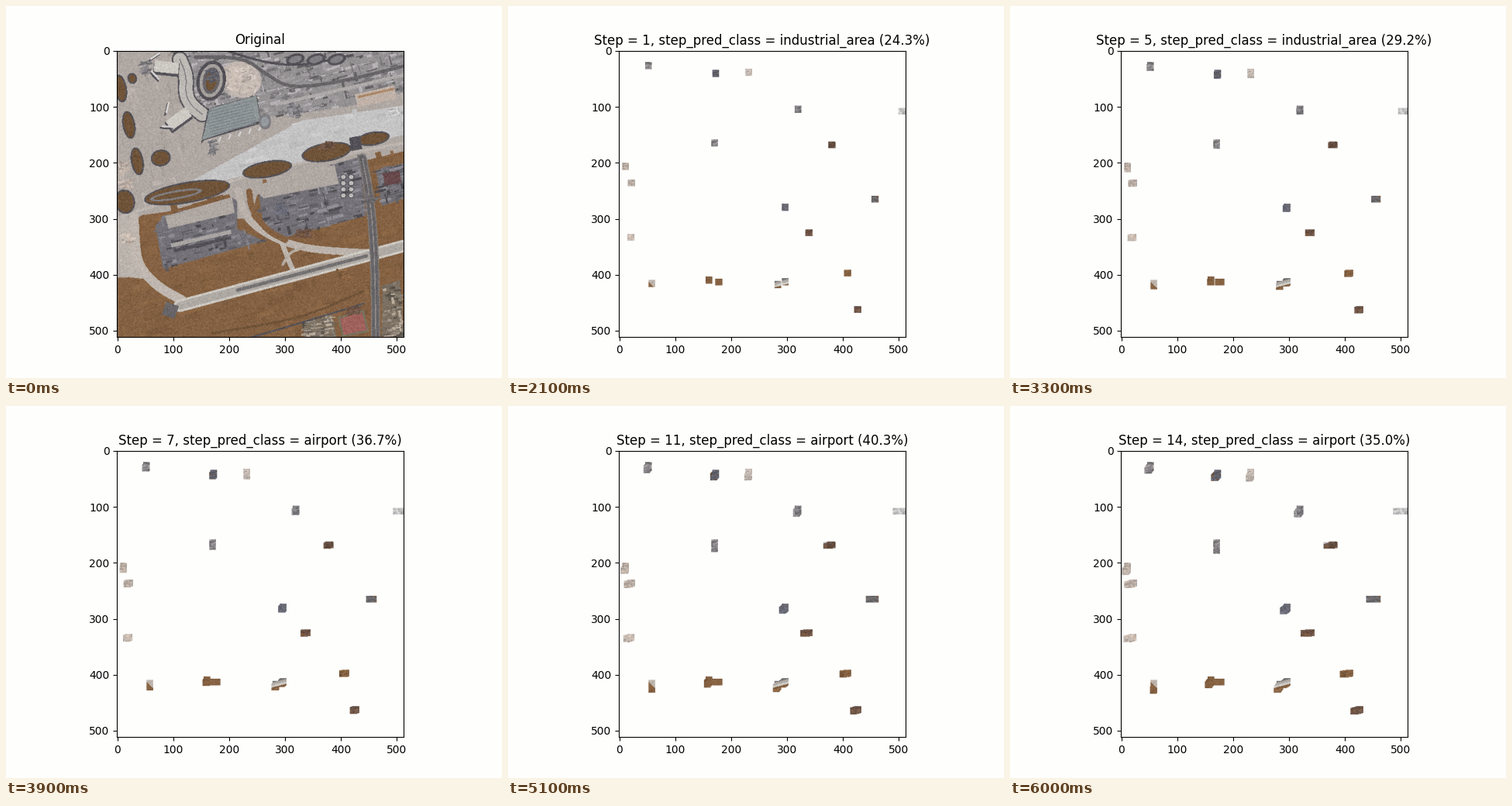
A matplotlib script that plays this animation: 640 by 480 pixels, repeating every 6.3 s.

```python
import math

import numpy as np
import matplotlib.pyplot as plt
from matplotlib.animation import FuncAnimation
from matplotlib.path import Path

SIZE, WINDOW, LAST = 512, 12, 14
STILL = 6  # ticks the full picture stays
PAPER = (254, 255, 253)
rng = np.random.default_rng(7)
Y, X = np.mgrid[0:SIZE, 0:SIZE].astype(float)

APRON, PALE, WHITE = (176, 168, 163), (198, 197, 198), (206, 202, 196)
GRASS, EARTH, UMBER = (133, 98, 67), (112, 84, 57), (110, 84, 70)
DARK, ROAD, SLATE, GREY = (84, 82, 88), (104, 101, 104), (100, 101, 112), (128, 126, 130)
SAND, BEIGE = (194, 184, 177), (192, 178, 168)

# start corner, steps down (the rest go left), tone of the ground there
AGENTS = [
    (47, 21, 9, GREY), (167, 35, 8, SLATE), (226, 33, 11, SAND), (314, 99, 9, GREY),
    (500, 103, 0, PALE), (165, 159, 14, GREY), (375, 163, 1, UMBER), (6, 201, 10, BEIGE),
    (17, 231, 3, BEIGE), (16, 328, 3, BEIGE), (53, 410, 13, None), (155, 404, 9, None),
    (173, 408, 0, None), (278, 412, 9, None), (291, 407, 6, None), (291, 274, 7, SLATE),
    (334, 320, 1, UMBER), (452, 260, 0, ROAD), (403, 392, 2, GRASS), (421, 457, 3, UMBER),
]
RESULTS = ([("chaparral", 10.9)]
           + [("industrial_area", p) for p in (24.3, 28.6, 31.0, 29.7, 29.2)]
           + [("airport", p) for p in (28.4, 36.7, 40.8, 41.6, 39.4, 40.3, 41.1, 40.2, 35.0)])

img = np.empty((SIZE, SIZE, 3))
img[:] = APRON


def shades(color, spread=.15):
    return [np.array(color) * k for k in np.linspace(1 - spread, 1 + spread, 5)]


def fill(pts, color):
    inside = Path(pts).contains_points(np.c_[X.ravel(), Y.ravel()])
    img[inside.reshape(SIZE, SIZE)] = color


def local(cx, cy, w, h, ang):
    r = int(math.hypot(w, h) / 2) + 2
    ys = slice(max(0, int(cy) - r), max(0, int(cy) + r))
    xs = slice(max(0, int(cx) - r), max(0, int(cx) + r))
    dx, dy = X[ys, xs] - cx, Y[ys, xs] - cy
    c, s = math.cos(math.radians(ang)), math.sin(math.radians(ang))
    return img[ys, xs], 2 * (dx * c + dy * s) / w, 2 * (dy * c - dx * s) / h


def box(cx, cy, w, h, color, ang=0):
    part, u, v = local(cx, cy, w, h, ang)
    part[(abs(u) <= 1) & (abs(v) <= 1)] = color


def oval(cx, cy, w, h, color, ang=0):
    part, u, v = local(cx, cy, w, h, ang)
    part[u * u + v * v <= 1] = color


def smooth(pts):
    for _ in range(2):
        out = [pts[0]]
        for (ax, ay), (bx, by) in zip(pts, pts[1:]):
            out += [(.75 * ax + .25 * bx, .75 * ay + .25 * by),
                    (.25 * ax + .75 * bx, .25 * ay + .75 * by)]
        pts = out + [pts[-1]]
    return pts


def strip(pts, width, color):
    pts = smooth(pts) if len(pts) > 2 else pts
    for (ax, ay), (bx, by) in zip(pts, pts[1:]):
        dx, dy = bx - ax, by - ay
        t = np.clip(((X - ax) * dx + (Y - ay) * dy) / (dx * dx + dy * dy), 0, 1)
        near = (X - ax - t * dx) ** 2 + (Y - ay - t * dy) ** 2
        img[near <= width * width / 4] = color


def clutter(pts, n, size, colors, ang=-14):
    area = Path(pts)
    lo, hi = np.min(pts, axis=0), np.max(pts, axis=0)
    for _ in range(n):
        x, y = rng.uniform(lo, hi)
        w, h = size * rng.uniform(.5, 2.2), size * rng.uniform(.15, .6)
        color = colors[rng.integers(len(colors))]
        if area.contains_point((x, y)):
            box(x, y, w, h, color, ang + 90 * (rng.random() < .2))


def island(cx, cy, w, h, ang=-10):
    oval(cx, cy, w, h, DARK, ang)
    oval(cx, cy, w - 6, h - 6, EARTH, ang)


def paint_grass():
    field = [(28, 305), (45, 294), (90, 288), (240, 245), (512, 180), (512, 512), (0, 512),
             (0, 405), (20, 405)]
    fill(field, GRASS)
    clutter(field, 250, 24, shades(GRASS, .06), -15)
    fill([(200, 255), (425, 190), (425, 205), (250, 258), (238, 300), (215, 300)], APRON)
    fill([(0, 300), (30, 298), (34, 350), (48, 408), (5, 403), (0, 340)], (188, 181, 174))
    strip([(30, 298), (32, 345), (38, 385), (72, 422), (116, 446)], 17, (192, 184, 176))
    strip([(217, 250), (222, 280), (240, 310), (284, 338), (340, 354), (400, 359),
           (460, 362)], 13, (188, 180, 172))
    strip([(295, 345), (305, 372), (314, 392)], 9, (190, 182, 174))
    strip([(335, 352), (308, 360), (296, 382)], 5, (182, 172, 162))
    strip([(112, 456), (512, 349)], 22, WHITE)
    strip([(112, 456), (512, 349)], 14, (176, 170, 165))
    strip([(215, 428), (445, 367)], 6, (116, 113, 114))
    box(95, 464, 24, 24, ROAD, 20)
    strip([(170, 505), (330, 478), (440, 430)], 4, EARTH)


def paint_apron():
    band = [(130, 235), (265, 160), (330, 125), (512, 98), (512, 150), (350, 195), (130, 246)]
    fill(band, PALE)
    clutter(band, 90, 16, shades(PALE, .05))
    clutter([(0, 0), (110, 0), (140, 240), (0, 300)], 80, 16, shades(APRON, .06), 75)
    strip([(0, 300), (130, 255), (300, 205), (512, 165)], 5, (188, 181, 176))


def paint_north():
    zone = [(100, 0), (512, 0), (512, 75), (420, 98), (330, 112), (255, 120), (140, 95)]
    fill(zone, (150, 147, 148))
    clutter(zone, 650, 9, shades((142, 139, 142), .3))
    oval(220, 52, 76, 64, SAND, 15)
    oval(220, 52, 60, 48, (204, 192, 183), 15)
    clutter([(190, 30), (250, 30), (250, 85), (190, 80)], 50, 7, shades(SAND, .12), 30)
    for k, color in enumerate((DARK, (166, 160, 157), ROAD, EARTH)):
        oval(168, 54, 52 - 11 * k, 72 - 12 * k, color, 10)
    strip([(140, 12), (225, 12), (270, 45), (310, 68), (400, 56), (512, 28)], 6, ROAD)
    strip([(200, 2), (265, 22), (330, 28), (420, 8)], 4, DARK)
    strip([(285, 96), (400, 70), (512, 44)], 6, (175, 171, 170))
    for x in (318, 355, 392):
        oval(x, 16, 34, 20, DARK, -15)
        oval(x, 16, 24, 12, GREY, -15)
    box(462, 82, 72, 24, BEIGE, -13)
    box(462, 76, 66, 4, (172, 136, 104), -13)


def paint_terminal():
    pier = [(112, 16), (124, 45), (122, 78), (132, 98), (152, 114)]
    strip(pier, 29, DARK)
    strip(pier, 24, (190, 186, 181))
    strip(pier, 2, GREY)
    for cx, cy, ang in ((88, 30, 6), (110, 122, -36)):
        box(cx, cy + 3, 46, 24, DARK, ang)
        box(cx, cy, 44, 20, WHITE, ang)
        for k in (-1, 1):
            box(cx - 22, cy + 17 * k, 24, 3, DARK, ang + 40 * k)
            box(cx - 20, cy + 17 * k - 3, 20, 3, (216, 215, 214), ang + 40 * k)
    fill([(150, 166), (162, 104), (249, 80), (258, 130), (156, 160)], DARK)
    fill([(152, 160), (165, 104), (248, 81), (256, 125)], (144, 151, 153))
    for k in range(9):
        box(200 + k, 100 + 5 * k, 84, 1.5, (124, 132, 137), -14)
    for k in range(6):
        box(165 + 18 * k, 164 - 5 * k, 10, 3, (214, 214, 214), -70)
    oval(264, 127, 22, 28, GREY)
    oval(264, 127, 14, 18, (150, 156, 160))


def paint_islands():
    for x, w, h in ((125, 156, 38), (268, 90, 30), (374, 90, 34), (457, 60, 25)):
        island(x, 290 - .29 * x, w, h)
    for k in range(3):
        island(6 + 15 * k, 68 + 65 * k, 23, 50)
    island(14, 270, 36, 44)
    island(78, 192, 36, 30)
    island(27, 50, 17, 20)
    oval(105, 258, 95, 16, GREY, -10)
    oval(105, 258, 80, 9, EARTH, -10)
    box(426, 166, 20, 24, DARK, -10)


def paint_blocks():
    tones = shades((112, 110, 116), .3)
    west = [(68, 312), (85, 296), (205, 262), (215, 270), (214, 318), (262, 340),
            (205, 356), (82, 390)]
    mid = [(252, 252), (397, 200), (434, 190), (444, 295), (300, 334), (262, 318)]
    east = [(462, 214), (512, 201), (512, 264), (473, 278)]
    for block, n in ((west, 200), (mid, 260), (east, 90)):
        fill(block, (116, 114, 120))
        clutter(block, n, 10, tones)
    fill([(86, 296), (205, 262), (210, 290), (92, 318)], APRON)
    fill([(246, 248), (388, 204), (396, 238), (262, 264)], APRON)
    box(150, 336, 110, 7, (170, 166, 164), -13)
    box(152, 346, 104, 6, DARK, -13)
    strip([(236, 252), (240, 285), (268, 322), (300, 338)], 11, GRASS)
    for k in range(8):
        oval(404 + 14 * (k % 2), 226 + 11 * (k // 2), 11, 10, DARK)
        oval(404 + 14 * (k % 2), 226 + 11 * (k // 2), 8, 7, (190, 188, 186))
    box(491, 228, 30, 22, (104, 74, 76), -10)
    road = [(438, 192), (452, 265), (460, 365), (462, 512)]
    for width, color in ((16, (128, 124, 122)), (12, ROAD), (1.6, (150, 147, 145))):
        strip(road, width, color)


def paint_town():
    town = [(474, 420), (505, 410), (512, 512), (474, 512)]
    lot = [(330, 486), (384, 474), (392, 512), (334, 512)]
    for area in (town, lot):
        fill(area, (124, 113, 98))
        clutter(area, 90, 8, shades((138, 128, 116), .35), -8)
    fill([(394, 476), (440, 463), (450, 502), (402, 512)], (120, 114, 94))
    fill([(398, 479), (437, 467), (446, 499), (405, 508)], (160, 98, 92))
    strip([(240, 512), (330, 486), (440, 452)], 3, DARK)


def paint_spots():
    for x, y, downs, tone in AGENTS:
        if tone is not None:
            left, right, low = x - LAST + downs, x + WINDOW, y + WINDOW + downs
            spot = [(left, y), (right, y), (right, low), (left, low)]
            clutter(spot, 40, 6, shades(tone))


def add_grain():
    fine = rng.normal(0, 6, (SIZE, SIZE))
    coarse = np.kron(rng.normal(0, 5, (256, 256)), np.ones((2, 2)))
    return np.clip(img + (fine + coarse)[..., None], 0, 255).astype(np.uint8)


for paint in (paint_grass, paint_apron, paint_north, paint_terminal, paint_islands,
              paint_blocks, paint_town, paint_spots):
    paint()
scene = add_grain()


def seen_at(step):
    view = np.empty_like(scene)
    view[:] = PAPER
    for x, y, downs, _ in AGENTS:
        for k in range(step + 1):
            # downward steps come a little early
            down = min(k, round(downs * (k / LAST) ** .75))
            left, top = x - (k - down), y + down
            area = slice(top, top + WINDOW), slice(left, left + WINDOW)
            view[area] = scene[area]
    return view


fig, ax = plt.subplots(figsize=(6.4, 4.8), dpi=100)
fig.set_facecolor([c / 255 for c in PAPER])
picture = ax.imshow(scene)
title = ax.set_title("Original")


def draw(tick):
    step = tick - STILL
    if step < 0:
        picture.set_data(scene)
        title.set_text("Original")
    else:
        name, score = RESULTS[step]
        picture.set_data(seen_at(step))
        title.set_text(f"Step = {step}, step_pred_class = {name} ({score:.1f}%)")
    return picture, title


anim = FuncAnimation(fig, draw, frames=STILL + len(RESULTS), interval=300,
                     repeat=True, repeat_delay=0)
plt.show()
```
